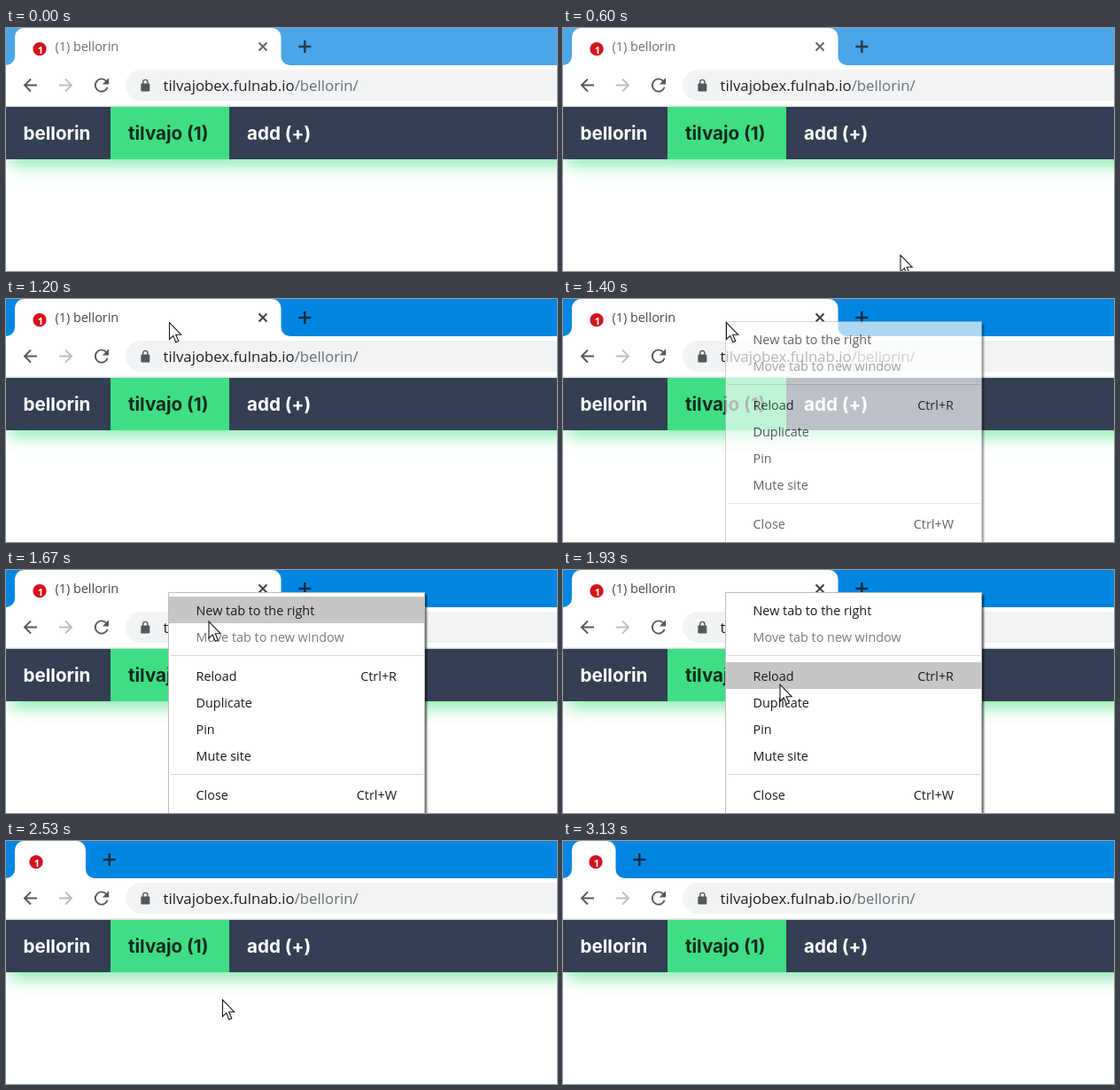
Animation, 622 px wide and 274 px high, one loop 3.34 s. Source, as an HTML page:

```html
<!DOCTYPE html>
<html lang="en">
<head>
<meta charset="utf-8">
<title>Pinning a tab</title>
<style>
  html, body { margin: 0; width: 100%; height: 100%; overflow: hidden; background: #fff; }
  svg { display: block; width: 622px; height: 274px; }
  text { font: 14.4px "Open Sans", "Noto Sans", sans-serif; white-space: pre; }
  .nav { font: 700 20.6px Inter, "Open Sans", sans-serif; fill: #fff; }
  .url { font-size: 16.8px; fill: #202124; }
  .line { fill: none; stroke: #54585d; stroke-width: 1.9; }
  #menu text { fill: #1b1b1b; }
  #menu .off { fill: #7a7a7a; }
</style>
</head>
<body>
<svg viewBox="0 0 622 274">
  <defs>
    <filter id="glow" x="-20%" y="-100%" width="140%" height="300%"><feGaussianBlur stdDeviation="10"/></filter>
    <filter id="soft" x="-5%" y="-5%" width="110%" height="110%"><feGaussianBlur stdDeviation="1.3"/></filter>
  </defs>

  <!-- page -->
  <rect width="622" height="274" fill="#fff"/>
  <rect x="4" y="95" width="720" height="59" fill="#3fde84" opacity=".68" filter="url(#glow)"/>
  <rect y="89" width="622" height="59" fill="#343f53"/>
  <rect id="addHover" x="252" y="89" width="112" height="59" fill="#000"/>
  <rect x="118" y="89" width="134" height="59" fill="#3fde84"/>
  <text class="nav" x="19.5" y="126">bellorin</text>
  <text class="nav" x="138" y="126" style="fill:#12291f">tilvajo (1)</text>
  <text class="nav" x="272" y="126">add (+)</text>

  <!-- tab strip -->
  <rect id="strip" width="622" height="43"/>
  <rect y="42" width="622" height="47" fill="#fff"/>
  <rect y="87.5" width="622" height="1.5" fill="#d9dce0"/>
  <path id="tab" fill="#fff"/>
  <g id="icon">
    <circle cx="38" cy="23.7" r="7.6" fill="#d4111b"/>
    <text x="39" y="28.8" text-anchor="middle" style="font-size:11px;font-weight:700;fill:#fff">1</text>
  </g>
  <g id="label">
    <text id="title" x="55.5" y="26">(1) bellorin</text>
    <path id="close" class="line" d="M285.5 16.5l9 9m0-9l-9 9"/>
  </g>
  <path id="plus" fill="none" stroke-width="2.5" d="M-7 21H7M0 14V28"/>

  <!-- toolbar -->
  <path class="line" d="M35 64.5H21.5M28 57.5l-7 7 7 7"/>
  <path class="line" style="stroke:#bbbec2" d="M60 64.5H73.5M67 57.5l7 7-7 7"/>
  <path class="line" d="M113.2 59.8A7.1 7.1 0 1 0 114.6 66.8"/>
  <path fill="#54585d" d="M116 56.3V63.5H108.8Z"/>
  <rect id="field" x="135" y="47" width="520" height="35" rx="17.5" fill="#f1f3f4"/>
  <rect x="152.3" y="62.6" width="10" height="8.8" rx="1.2" fill="#54585d"/>
  <path class="line" style="stroke-width:1.4" d="M154.7 63V61a2.6 2.6 0 0 1 5.2 0V63"/>
  <text class="url" x="177.5" y="71">tilvajobex.fulnab.io<tspan fill="#6a6e73">/bellorin/</tspan></text>

  <!-- context menu -->
  <g id="menu">
    <rect x="186" y="28" width="289" height="262" fill="#000" opacity=".6" filter="url(#soft)"/>
    <rect x="183.5" y="25.5" width="289" height="262" fill="#fff" stroke="#bdbdbd"/>
    <rect id="hover" x="184" width="288" height="30" fill="#c6c6c6"/>
    <path stroke="#d8d8d8" d="M186 96.5H471M186 230.5H471"/>
  </g>

  <path id="cursor" fill="#fff" stroke="#16181d" stroke-width="1.1"
    d="M0 0V18.9L4.3 14.9 7.2 22.3 10.3 21 7.2 13.7H13.2Z"/>
</svg>
<script>
const LOOP = 3340, STEP = 1000 / 15;
const ACTIVE = 1125, MENU = 1325, PIN = 2398;
const WIDE = 310.5, PINNED = 59.5;
const $ = id => document.getElementById(id);
const clamp = v => Math.max(0, Math.min(1, v));

// top of row, label, shortcut, disabled
const items = [
  [30, "New tab to the right"],
  [60, "Move tab to new window", "", true],
  [104, "Reload", "Ctrl+R"],
  [134, "Duplicate"],
  [164, "Pin"],
  [194, "Mute site"],
  [238, "Close", "Ctrl+W"]
];

// time, x, y of the pointer tip
const path = [
  [600, 381, 256], [667, 338, 178], [733, 284, 112], [800, 235, 64],
  [867, 205, 39], [933, 190, 30], [1000, 181, 26], [1067, 184.5, 26.5],
  [1467, 184.5, 26.5], [1533, 195, 33], [1600, 213, 46], [1667, 229, 58],
  [1800, 238, 88], [1933, 245, 129], [2067, 245, 165], [2133, 244.5, 173],
  [2200, 244.5, 179], [2600, 244.5, 179], [2733, 222, 188], [2867, 181, 205],
  [2933, 155, 224], [3067, 94, 268], [3133, 70, 300]
];

function pointer(t) {
  const i = path.findIndex(p => p[0] > t + .5);
  if (i < 1) return [0, 320];
  const a = path[i - 1], b = path[i];
  const k = clamp((t - a[0]) / (b[0] - a[0]));
  return [a[1] + (b[1] - a[1]) * k, a[2] + (b[2] - a[2]) * k];
}

// rises after start, falls after end
const pulse = (t, start, end) => clamp((t - start) / 60) * (1 - clamp((t - end) / 200));

function tabShape(r) {
  return `M0 42A10 10 0 0 0 10 32V10A10 10 0 0 1 20 0H${r - 10}A10 10 0 0 1 ${r} 10V32A10 10 0 0 0 ${r + 10} 42Z`;
}

function addText(x, y, str, anchor, off) {
  const el = document.createElementNS("http://www.w3.org/2000/svg", "text");
  el.setAttribute("x", x);
  el.setAttribute("y", y);
  el.setAttribute("text-anchor", anchor);
  if (off) el.setAttribute("class", "off");
  el.textContent = str;
  $("menu").append(el);
}

for (const [y, label, keys, off] of items) {
  addText(214.5, y + 21, label, "start", off);
  if (keys) addText(441, y + 21, keys, "end");
}

function draw(t) {
  const active = t >= ACTIVE, pinned = t >= PIN;
  const [x, y] = pointer(t);

  $("strip").setAttribute("fill", active ? "#0086e0" : "#4aa6e8");
  $("title").setAttribute("fill", active ? "#45494d" : "#6b6f74");
  $("close").style.stroke = active ? "#3c4043" : "#5f6368";
  $("plus").setAttribute("stroke", active ? "#142c42" : "#2a3b4c");

  const left = 1 - clamp((t - 2403) / 200);
  const right = PINNED + (WIDE - PINNED) * left * left;
  $("tab").setAttribute("d", tabShape(right));
  $("plus").setAttribute("transform", `translate(${right + 26.8} 0)`);
  $("label").style.display = pinned ? "none" : "";
  const shift = pinned ? -1 - 3 * clamp((2600 - t) / 60) : 0;
  $("icon").setAttribute("transform", `translate(${shift} 0)`);

  $("addHover").setAttribute("opacity", .06 * pulse(t, 680, 760));
  $("field").setAttribute("fill", pulse(t, 740, 840) > .5 ? "#eceef0" : "#f1f3f4");

  const open = t >= MENU && !pinned;
  $("menu").style.display = open ? "" : "none";
  $("menu").setAttribute("opacity", clamp((t - MENU + 60) / 200));
  const row = items.find(i => !i[3] && y >= i[0] && y < i[0] + 30);
  $("hover").style.display = row ? "" : "none";
  if (row) $("hover").setAttribute("y", row[0]);

  $("cursor").setAttribute("transform", `translate(${x} ${y})`);
}

const start = performance.now();
function tick() {
  const t = (performance.now() - start) % LOOP;
  draw(Math.floor((t + 4) / STEP) * STEP);
  requestAnimationFrame(tick);
}
tick();
</script>
</body>
</html>
```
